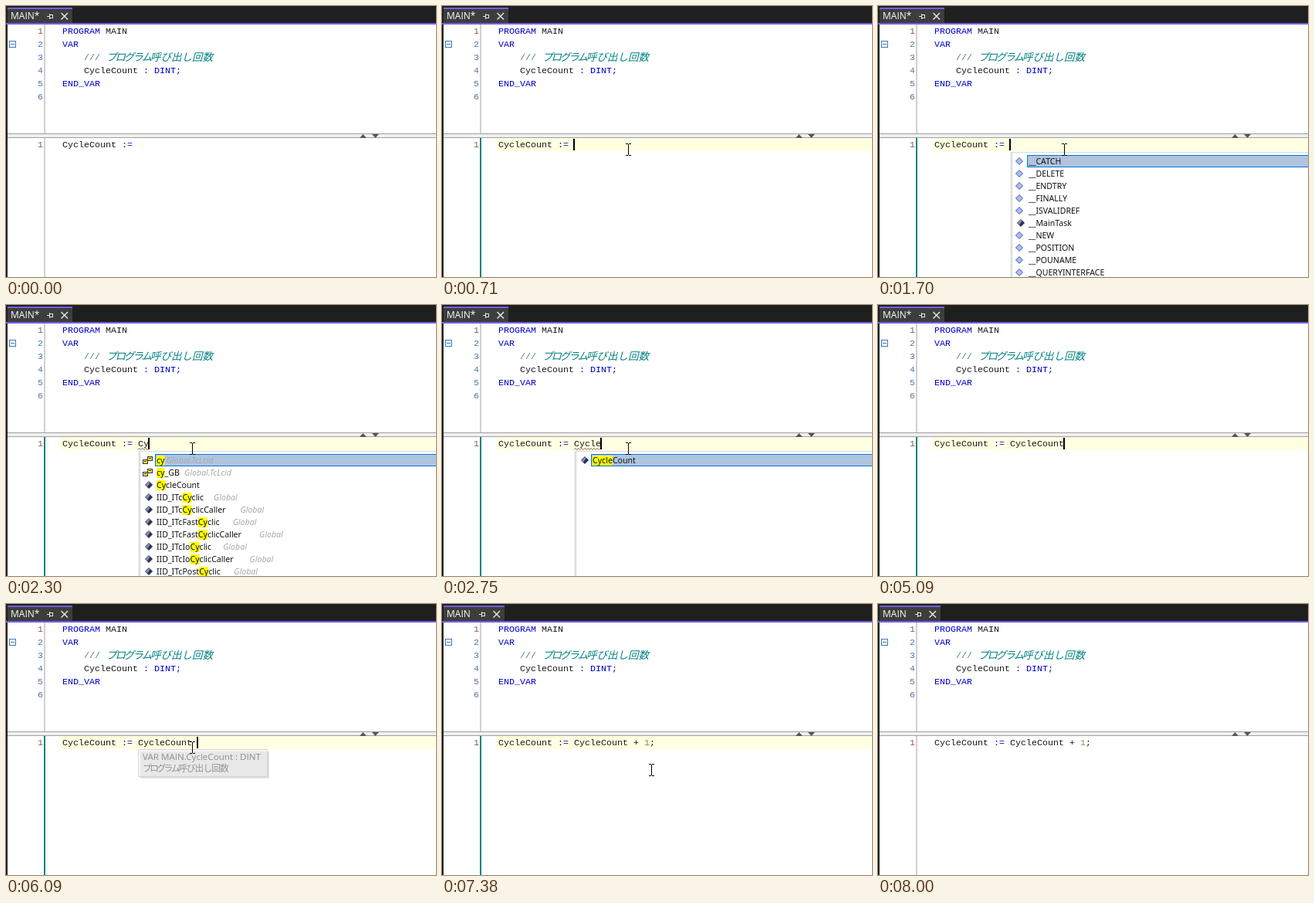
An HTML page with a canvas that plays this animation: 557 by 351 pixels, repeating every 8070 ms.

```html
<!DOCTYPE html>
<html lang="ja">
<head>
<meta charset="utf-8">
<title>Code completion</title>
<style>
html, body { margin: 0; width: 100%; height: 100%; overflow: hidden; background: #fff; }
canvas { display: block; }
</style>
</head>
<body>
<canvas id="stage" width="557" height="351"></canvas>
<script>
const c = document.getElementById('stage').getContext('2d');
const LOOP = 8070, CHAR = 7, LEFT = 73;
const MONO = '11.667px "Liberation Mono", monospace';
const LIST = '10.6px "Noto Sans", sans-serif';
const UI = '"Open Sans", sans-serif';
const BLUE = '#0000c8', INK = '#1a1a1a', TEAL = '#008080';

const typed = [
  [0, ''], [2100, 'C'], [2300, 'Cy'], [2420, 'Cyc'], [2620, 'Cycl'], [2750, 'Cycle'],
  [4100, 'CycleCount'], [5820, 'CycleCount '], [6300, 'CycleCount +'],
  [6430, 'CycleCount + '], [6500, 'CycleCount + 1'], [6850, 'CycleCount + 1;']
];
const caretOn = [[700, 1180], [1570, 3300], [3830, 4630], [5090, 5690], [5820, 7380]];

// Suggestion: name, icon kind, scope
const keyword = s => ['__' + s, 'light', ''];
const symbol = s => ['IID_ITc' + s, 'dark', 'Global'];
const keywords = ['CATCH', 'DELETE', 'ENDTRY', 'FINALLY', 'ISVALIDREF', 'MainTask',
  'NEW', 'POSITION', 'POUNAME', 'QUERYINTERFACE'].map(keyword);
keywords[5][1] = 'dark';
const own = ['CycleCount', 'dark', ''];
const cyclic = [own, ...['Cyclic', 'CyclicCaller', 'FastCyclic', 'FastCyclicCaller', 'IoCyclic',
  'IoCyclicCaller', 'PostCyclic', 'PostCyclicCaller'].map(symbol)];
const enums = [['cy', 'enum', 'Global.TcLcid'], ['cy_GB', 'enum', 'Global.TcLcid']];

function suggestions(word) {
  if (!word) return keywords;
  if (word === 'C') return [keywords[0], keywords[9], ...enums, ...cyclic];
  if (word === 'Cy') return [...enums, ...cyclic];
  return word === 'Cycle' ? [own] : cyclic;
}

const within = (t, a, b) => t >= a && t < b;

function box(color, x, y, w, h) {
  c.fillStyle = color;
  c.fillRect(x, y, w, h);
}

function text(s, x, y, color, font, spacing = 0) {
  c.font = font;
  c.letterSpacing = spacing + 'px';
  c.fillStyle = color;
  c.fillText(s, x, y);
  const w = c.measureText(s).width;
  c.letterSpacing = '0px';
  return w;
}

function path(points, close) {
  c.beginPath();
  points.forEach(([x, y]) => c.lineTo(x, y));
  if (close) c.closePath();
}

function line(color, width, ...points) {
  path(points);
  c.strokeStyle = color;
  c.lineWidth = width;
  c.stroke();
}

function shape(color, ...points) {
  path(points, true);
  c.fillStyle = color;
  c.fill();
}

function frame(color, x, y, w, h) {
  c.strokeStyle = color;
  c.lineWidth = 1;
  c.strokeRect(x + .5, y + .5, w - 1, h - 1);
}

const code = (s, col, y, color = INK) => text(s, LEFT + col * CHAR, y, color, MONO);

function japanese(x, y, color, style, size, kana, kanji) {
  const font = `${style} ${size}px "Noto Sans CJK JP", "Noto Sans CJK", sans-serif`;
  text('プログラム', x, y, color, font, kana - size);
  text('呼び出し回数', x + kana * 5, y, color, font, kanji - size);
}

function tab(saved) {
  const w = saved ? 79 : 84, r = 2 + w;
  box('#1f1f1f', 0, 0, 557, 22);
  box('#3d3d3d', 2, 2, w, 20);
  box('#7160e8', 2, 2, w, 2);
  box('#7160e8', 0, 22, 557, 2);
  text(saved ? 'MAIN' : 'MAIN*', 6, 17, '#fff', '12px ' + UI);
  const p = r - 33;
  line('#e8e8e8', 1, [p, 13.5], [p + 3, 13.5]);
  line('#e8e8e8', 1, [p + 3.5, 10], [p + 3.5, 17]);
  frame('#e8e8e8', p + 3, 11, 5, 5);
  line('#e8e8e8', 1.4, [r - 14.5, 9], [r - 6, 17.5]);
  line('#e8e8e8', 1.4, [r - 6, 9], [r - 14.5, 17.5]);
}

function lineNumber(n, y) {
  text(n, 41, y, n === 1 ? '#8a5a48' : '#5577a0', MONO);
}

function declarations() {
  for (let n = 1; n <= 6; n++) lineNumber(n, 19 + n * 17);
  frame('#3c78c0', 4, 45, 9, 9);
  line('#3c78c0', 1, [6, 49.5], [11, 49.5]);
  code('PROGRAM', 0, 36, BLUE);
  code('MAIN', 8, 36);
  code('VAR', 0, 53, BLUE);
  code('///', 4, 70, '#4f7c7c');
  japanese(130, 71, TEAL, 'italic', 13.5, 11.4, 13.5);
  code('CycleCount', 4, 87);
  code(': DINT;', 15, 87, BLUE);
  code('END_VAR', 0, 104, BLUE);
}

function divider() {
  box('#f0f0f0', 2, 165, 555, 6);
  box('#a0a0a0', 2, 165, 555, 1);
  box('#a0a0a0', 2, 170, 555, 1);
  shape('#555', [458, 171], [462.5, 166], [467, 171]);
  shape('#555', [474, 166], [483, 166], [478.5, 171]);
}

function icon(kind, y) {
  if (kind === 'enum') {
    for (const [x, dy] of [[177, -1], [183, -5]]) {
      box('#f5e04a', x, y + dy, 7, 6);
      frame('#333', x, y + dy, 7, 6);
      line('#333', 1, [x + 2, y + dy + 2.5], [x + 5, y + dy + 2.5]);
    }
    return;
  }
  const dark = kind === 'dark', x = dark ? 185 : 183;
  const diamond = [[x, y - 4.5], [x + 4.5, y], [x, y + 4.5], [x - 4.5, y]];
  shape(dark ? '#8890b8' : '#a9bcf4', ...diamond);
  if (dark) shape('#2c3050', [x + 2, y - 3], [x + 4.5, y], [x, y + 4.5], [x - 2, y + 2.5]);
  line(dark ? '#333a60' : '#4458a8', 1, ...diamond, diamond[0]);
}

function popup(word) {
  box('#ececec', 171, 189, 2, 162);
  box('#fff', 173, 189, 384, 162);
  box('#d0d0d0', 173, 189, 1, 162);
  box('#d8d8d8', 173, 189, 384, 1);
  box('#b0c4de', 193, 193, 366, 16);
  frame('#0078d7', 193, 193, 366, 16);
  suggestions(word).slice(0, 10).forEach(([name, kind, scope], i) => {
    const y = 201 + i * 16;
    icon(kind, y);
    c.font = LIST;
    const at = name.toLowerCase().indexOf(word.toLowerCase());
    if (word && at >= 0) {
      const x = c.measureText(name.slice(0, at)).width;
      const w = c.measureText(name.slice(at, at + word.length)).width;
      box('#ffff00', 195 + x, y - 6, w, 13);
    }
    const w = text(name, 195, y + 4, '#111', LIST);
    text(scope, 195 + w * 1.21, y + 4, '#a8a8a8', 'italic ' + LIST);
  });
}

function tooltip(alpha) {
  c.globalAlpha = alpha;
  box('#c4c4c4', 174, 191, 167, 35);
  box('#f0f0f0', 171, 188, 168, 36);
  frame('#b8b8b8', 171, 188, 168, 36);
  text('VAR MAIN.CycleCount : DINT', 177, 202, '#333', '11.6px ' + UI);
  japanese(177, 217, '#3a4658', '', 11.8, 9.2, 10.8);
  c.globalAlpha = 1;
}

function pointerAt(t) {
  if (t < 70 || within(t, 4100, 5490) || t >= 7800) return null;
  if (t < 7380) {
    const s = Math.min(1, Math.floor((t - 70) / 70) / 8), e = (1 - s) ** 2;
    return [241 + 230 * e, 186 + 152 * e];
  }
  const s = Math.floor((t - 7380) / 70) / 5;
  return [271 + 213 * s, 215 + 130 * s];
}

function pointer(px, py) {
  const x = Math.round(px), y = Math.round(py);
  box('#000', x, y - 7, 1, 14);
  for (const dy of [-8, 7]) {
    box('#000', x - 3, y + dy, 3, 1);
    box('#000', x + 1, y + dy, 3, 1);
  }
}

function statement(t, word) {
  const active = within(t, 700, 8000);
  if (active) box('#ffffe1', 70, 171, 487, 17);
  box(active ? TEAL : '#d0d0d0', 49, 171, 2, 180);
  lineNumber(1, 183);
  code('CycleCount', 0, 183);
  code(':=', 11, 183, BLUE);
  code(word.slice(0, 13), 14, 183);
  code(word.slice(13, 14), 27, 183, '#8a8a5a');
  code(word.slice(14), 28, 183);
  if (word && t < 4100) {
    const wave = [];
    for (let i = 0; i <= word.length * CHAR; i += 2) wave.push([171 + i, i % 4 ? 185.5 : 187.5]);
    line('#6b604a', 1, ...wave);
  }
}

function draw(t) {
  const word = typed.findLast(([start]) => t >= start)[1];
  box('#fff', 0, 0, 557, 351);
  box('#d0d0d0', 49, 24, 2, 141);
  declarations();
  statement(t, word);
  divider();
  tab(t >= 6980);
  box('#1f1f1f', 0, 24, 2, 327);
  if (within(t, 1700, 4100)) popup(word);
  if (within(t, 6030, 6430)) tooltip(Math.min(1, Math.floor((t - 5950) / 70) / 4));
  if (caretOn.some(([a, b]) => within(t, a, b))) {
    box('#000', LEFT + (14 + word.length) * CHAR - 1, 172, 2, 15);
  }
  const p = pointerAt(t);
  if (p) pointer(...p);
}

const start = performance.now();
function tick() {
  draw((performance.now() - start) % LOOP);
  requestAnimationFrame(tick);
}
tick();
</script>
</body>
</html>
```
